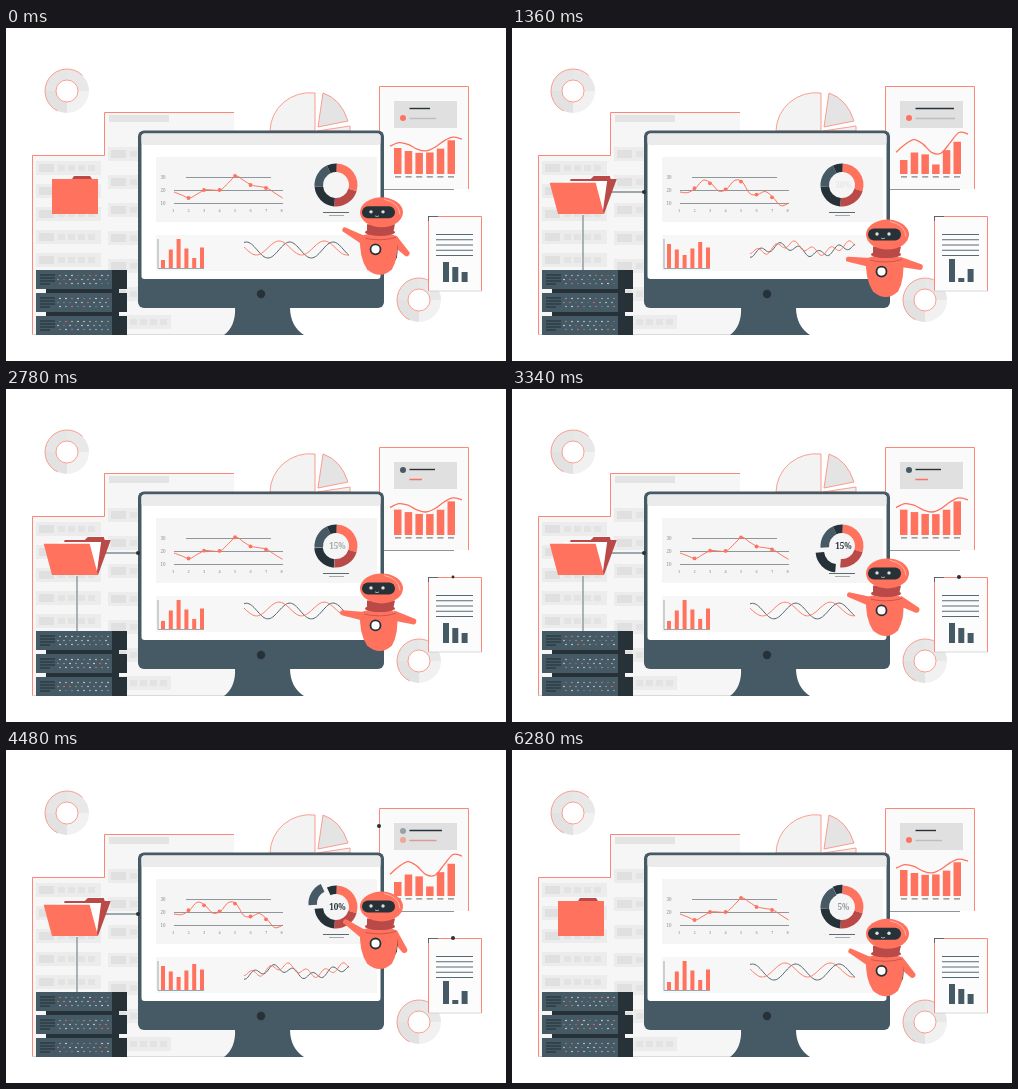
An HTML page for the animation above (6.3 s loop, 500 px wide and 333 px high).

```html
<!DOCTYPE html>
<html lang="en">
<head>
<meta charset="utf-8">
<title>Data dashboard robot</title>
<style>
html, body { margin: 0; width: 100%; height: 100%; overflow: hidden; background: #fff; }
svg { display: block; width: 500px; height: 333px; }
</style>
</head>
<body>
<svg id="stage" viewBox="0 0 500 333"></svg>
<script>
const LOOP = 6300, TURN = 2 * Math.PI / LOOP;
const RED = '#ff725e', BRICK = '#b94a48', SLATE = '#455a64', INK = '#263238';
const PAPER = '#f6f6f6', EDGE = '#fb8778';
const stage = document.getElementById('stage');
const { sin, cos, exp, hypot, floor, min, max, PI } = Math;

// --- helpers ---
function set(node, attrs) {
  for (const key in attrs) node.setAttribute(key, attrs[key]);
  return node;
}
function add(tag, attrs, parent = stage) {
  const node = document.createElementNS('http://www.w3.org/2000/svg', tag);
  parent.appendChild(node);
  return set(node, attrs);
}
const times = (n, make) => Array.from({ length: n }, (_, i) => make(i));
const box = (x, y, width, height, fill, parent) => add('rect', { x, y, width, height, fill }, parent);
const dot = (cx, cy, r, fill, parent) => add('circle', { cx, cy, r, fill }, parent);
const shape = (d, fill, parent) => add('path', { d, fill }, parent);
const stroke = (d, color, width = 1, parent = stage) =>
  add('path', { d, fill: 'none', stroke: color, 'stroke-width': width }, parent);
function label(x, y, size, text, fill) {
  const node = add('text', { x, y, fill, 'font-size': size, 'text-anchor': 'middle',
    'font-family': '"Noto Serif", "DejaVu Serif", serif' });
  node.textContent = text;
  return node;
}
const clamp = v => max(0, min(1, v));
const smooth = v => { v = clamp(v); return v * v * (3 - 2 * v); };
const mix = (a, b, k) => a + (b - a) * k;
const ramp = (t, from, to) => smooth((t - from) / (to - from));
const pulse = (t, on, onEnd, off, offEnd) => ramp(t, on, onEnd) * (1 - ramp(t, off, offEnd));

function polar(cx, cy, r, deg) {
  const a = (deg - 90) * PI / 180;
  return `${cx + r * cos(a)} ${cy + r * sin(a)}`;
}
function arc(cx, cy, r, from, to) {
  return `M${polar(cx, cy, r, from)}A${r} ${r} 0 ${to - from > 180 ? 1 : 0} 1 ${polar(cx, cy, r, to)}`;
}
function ring(cx, cy, outer, inner, from, to) {
  return arc(cx, cy, outer, from, to) + `L${polar(cx, cy, inner, to)}` +
    `A${inner} ${inner} 0 ${to - from > 180 ? 1 : 0} 0 ${polar(cx, cy, inner, from)}Z`;
}
function curve(pts) {
  let d = `M${pts[0]}`;
  for (let i = 0; i < pts.length - 1; i++) {
    const a = pts[max(0, i - 1)], b = pts[i], c = pts[i + 1], e = pts[min(pts.length - 1, i + 2)];
    d += `C${b[0] + (c[0] - a[0]) / 6} ${b[1] + (c[1] - a[1]) / 6} ` +
      `${c[0] - (e[0] - b[0]) / 6} ${c[1] - (e[1] - b[1]) / 6} ${c[0]} ${c[1]}`;
  }
  return d;
}
function random(n) {
  const v = sin(n * 127.1 + 11.7) * 43758.5453;
  return v - floor(v);
}

// --- backdrop ---
shape('M26 307V127H98V84H228V307Z', PAPER);
stroke('M26.5 307V127.5H98.5V84.5H228', EDGE);
stroke('M26 306.5H228', '#cfcfcf', .7);
function shelf(x, y, w) {
  box(x, y, w, 14, '#ececec');
  box(x + 3, y + 3, 15, 8, '#e0e0e0');
  for (let i = 0; i < 4; i++) box(x + 22 + i * 10, y + 4, 7, 6, '#e3e3e3');
}
box(103, 87, 60, 7, '#e4e4e4');
for (let i = 0; i < 7; i++) shelf(102, 119 + i * 28, 63);
for (let i = 0; i < 5; i++) shelf(30, 133 + i * 23, 65);

for (const [x, y] of [[61, 63], [413, 272]]) {
  ['#e8e8e8', '#f1f1f1', '#e2e2e2', '#e6e6e6'].forEach((fill, i) =>
    shape(ring(x, y, 22, 11, i * 90, i * 90 + 90), fill));
  stroke(arc(x, y, 22, 205, 405), EDGE, .8);
  add('circle', { cx: x, cy: y, r: 11, fill: '#fff', stroke: EDGE, 'stroke-width': .8 });
}
for (const [d, fill] of [
  ['M309 103H264A40 39 0 0 1 309 65Z', '#f3f3f3'],
  ['M312 99L317 65Q335 71 342 93Z', '#e4e4e4'],
  ['M311 103L344 98V103Z', '#f0f0f0']
]) set(shape(d, fill), { stroke: EDGE, 'stroke-width': .8 });

// --- report page ---
box(373, 58, 90, 103, '#fafafa');
stroke('M373.5 161V58.5H462.5V161', EDGE);
stroke('M378 161.5H448', '#7f8b91', .9);
box(388, 73, 63, 27, '#e0e0e0');
const keyDots = [dot(397, 81, 3, SLATE), dot(397, 90, 3, RED)];
const keyLines = [INK, '#bdbdbd', RED].map(color => stroke('', color, 1.4));
const reportLine = stroke('', RED, 1.3);
for (let i = 0; i < 6; i++) box(389 + i * 10.6, 148.4, 6, 1, '#666');

// --- small page ---
box(422, 188, 54, 75, '#fcfcfc');
stroke('M422.5 263V188.5H475.5V263', EDGE);
stroke('M422 263H476', '#c5cacc', .7);
stroke('M422 188.5H432M422.5 188V193', SLATE, .8);
for (let i = 0; i < 5; i++) stroke(`M430 ${206.5 + i * 5.25}H467`, SLATE, .9);

// --- monitor ---
shape('M229 279H284Q284 298 298 307H218Q230 298 229 279Z', SLATE);
set(box(132, 102.5, 246, 177.5, SLATE), { rx: 6 });
set(box(135.5, 105.5, 239, 145.5, '#fff'), { rx: 3 });
set(box(135.5, 105.5, 239, 11.5, '#ebebeb'), { rx: 3 });
box(150, 129, 221, 65, '#f5f5f5');
box(150, 207, 221, 36, '#f7f7f7');
dot(255, 266, 4.2, INK);

stroke('M180 149.5H265M168 162.5H277M168 175.5H277', '#777f83', .8);
for (let i = 0; i < 3; i++) label(157, 151 + i * 13, 4.5, 30 - i * 10, '#888');
for (let i = 0; i < 8; i++) label(167 + i * 15.5, 184, 4, i + 1, '#888');
const trend = stroke('', RED, 1);
const trendDots = times(6, () => dot(0, 0, 1.9, RED));

stroke('M152 211V240.5H198', '#77858c', .7);
const waves = [SLATE, RED].map(color => stroke('', color, .9));

// --- donut: clockwise edges of the slices and their shares ---
const EDGES = [2, 107, 185, 265, 335, 362], SHARES = [40, 30, 15, 10, 5];
const slices = [RED, BRICK, INK, SLATE, INK].map((fill, i) =>
  shape(ring(330, 157, 21.5, 13, EDGES[i], EDGES[i + 1]), fill));
const percent = set(label(331.5, 160, 8.2, '', INK), { 'font-weight': 700 });
stroke('M317 184.5H343', '#5c6b72', 1);
stroke('M323 187.5H338', '#8b969b', .8);

// --- bar sets: height as a rule of index i and stir k ---
const BARS = [
  { n: 6, x: 155, step: 7.8, w: 4, base: 240, fill: RED,
    tall: (i, k) => 18 + i / 2 + mix(-10, 6, k * k) * cos(PI * i / 2) },
  { n: 6, x: 388, step: 10.7, w: 7.5, base: 146, fill: RED,
    tall: (i, k) => 26 - 3.2 * i + .19 * i ** 3 - k * (5 + 7 * cos(PI * i / 1.5)) },
  { n: 3, x: 437, step: 9.3, w: 6, base: 254, fill: SLATE,
    tall: (i, k) => 20 - 5 * i + k * k * (7 * cos(PI * i) - 4) }
];
for (const set of BARS) set.nodes = times(set.n, () => box(0, 0, 0, 0, set.fill));

const TREND = [164, 170, 162, 162, 148, 157, 160, 170];
function trendY(i, k) {
  const a = TREND[floor(i / 2)], b = TREND[floor((i + 1) / 2)];
  const stir = 5 * sin(PI * i / 2) - 10 * cos(i / 3 - .5);
  return (a + b) / 2 + k * stir * min(1, i / 2);
}
const reportY = (i, k) => 121 - .9 * i - 5.5 * cos(PI * (i - 1) / 3) + 6 * k * cos(1.25 * i);
const WAVES = [
  (x, k) => 222 + mix(8 * cos((x - 262) / 6.9), 3.5 * sin(x / 3.1) + 4 * cos((x - 305) / 11), k),
  (x, k) => 220 + mix(-7 * cos((x - 273) / 7.2), 3.5 * cos(x / 2.9) - 4 * cos((x - 278) / 10), k)
];

// --- servers ---
const leds = [];
for (let unit = 0; unit < 3; unit++) {
  const y = 242 + unit * 23;
  if (unit) box(40, y - 4, 73, 4, INK);
  box(30, y, 77, 19, SLATE);
  box(106, y, 15, 19, INK);
  for (let i = 0; i < 4; i++) stroke(`M34 ${y + 5 + i * 3}H${i < 3 ? 49 : 44}`, INK, 1.1);
  for (let row = 0; row < 3; row++)
    for (let i = 0; i < 9; i++)
      leds.push(dot(54 + i * 6 - (row % 2) * 2, y + 5.5 + row * 4, .75, '#fff'));
}

// --- folder and links ---
const linkDown = stroke('', '#7c888d', 1.2);
const linkRight = stroke('', SLATE, 1.2);
// each leaf leans around the bottom edge
const leaves = [
  ['M46 186V151H66L68 148H84L86 151H92V186Z', BRICK, -20, 0],
  ['M47 185V153H90.5V185Z', '#fff', -8, 0],
  ['M46 186V151H92V186Z', RED, 15, .11]
].map(([d, fill, lean, squash]) => ({ node: shape(d, fill), lean, squash }));
const pins = [[132, 164, 900, 5500], [447, 188, 2650, 6000], [373, 76, 3550, 6000]]
  .map(([x, y, on, off]) => ({ on, off, node: dot(x, y, 0, INK) }));

// --- robot ---
const bot = add('g', {});
const armRight = shape('', RED, bot);
const armShade = shape('M388 208Q393 216 391 229L386 238Z', INK, bot);
shape('M354 208Q374 201 391 208Q393 229 386 241Q374 252 361 241Q353 229 354 208Z', RED, bot);
stroke('M355 209Q374 214 390 209', BRICK, .7, bot);
shape('M361 196H389L387 205Q374 210 361 205Z', BRICK, bot);
add('ellipse', { cx: 374, cy: 204, rx: 15, ry: 3.5, fill: BRICK }, bot);
add('ellipse', { cx: 375.5, cy: 184, rx: 21.5, ry: 15, fill: RED }, bot);
set(box(356, 178, 33, 12, INK, bot), { rx: 6 });
stroke('M378 171Q393 174 394 186', '#ffc4ba', .8, bot);
for (const x of [365, 377]) dot(x, 183.5, 1.7, '#e0e0e0', bot);
stroke('M369 187.5Q371 189 373 187.5', '#e0e0e0', .7, bot);
add('circle', { cx: 369.5, cy: 221, r: 5, fill: '#fff', stroke: INK, 'stroke-width': 1.8 }, bot);
const armLeft = shape('', RED, bot);
function arm(sx, sy, hx, hy, wide, thin) {
  const len = hypot(hx - sx, hy - sy), nx = -(hy - sy) / len, ny = (hx - sx) / len;
  return `M${sx + nx * wide} ${sy + ny * wide}L${hx + nx * thin} ${hy + ny * thin}` +
    `A${thin} ${thin} 0 0 0 ${hx - nx * thin} ${hy - ny * thin}L${sx - nx * wide} ${sy - ny * wide}Z`;
}

// --- drawing ---
function drawCharts(t) {
  // charts are stirred up and calm down twice per loop
  const k = pulse(t % (LOOP / 2), 0, 1350, 1350, 3000);
  for (const { nodes, x, step, w, base, tall } of BARS)
    nodes.forEach((node, i) => {
      const height = tall(i, k);
      set(node, { x: x + i * step, y: base - height, width: w, height });
    });

  const points = times(15, i => [168 + i * 7.75, trendY(i, k)]);
  set(trend, { d: curve(points) });
  trendDots.forEach((node, i) => {
    const [cx, cy] = points[2 + i * 2];
    set(node, { cx: cx - 1, cy });
  });
  set(reportLine, { d: curve(times(9, i => [384 + i * 9, reportY(i, k)])) });
  waves.forEach((node, w) =>
    set(node, { d: curve(times(43, i => [238 + i * 2.5, WAVES[w](238 + i * 2.5, smooth(k * 1.6))])) }));
}

function drawDonut(t) {
  percent.textContent = '';
  slices.forEach((node, i) => {
    const start = 50 + i * 1285;
    const show = clamp(min(t - start, start + 1285 - t) / 400);
    const angle = ((EDGES[i] + EDGES[i + 1]) / 2 - 90) * PI / 180, push = 7 * show ** 3;
    set(node, { transform: `translate(${push * cos(angle)} ${push * sin(angle)})` });
    if (show > 0) {
      percent.textContent = SHARES[i] + '%';
      set(percent, { opacity: show });
    }
  });
}

function drawLegend(t) {
  const focus = pulse(t, 1400, 2100, 3800, 5100), grow = pulse(t, 0, 1200, 5400, LOOP);
  set(keyDots[0], { opacity: focus });
  set(keyDots[1], { opacity: 1 - focus });
  set(keyLines[0], { d: `M403.5 80.5H${424 + 18 * grow - 13 * focus}` });
  for (const line of keyLines.slice(1)) set(line, { d: `M403.5 90.5H${430 + 13 * grow - 27 * focus}` });
  set(keyLines[2], { opacity: focus });
}

function drawFolder(t) {
  const open = pulse(t, 350, 1150, 5550, 6150);
  for (const { node, lean, squash } of leaves)
    set(node, { transform:
      `translate(46 186) skewX(${lean * open}) scale(1 ${1 - squash * open}) translate(-46 -186)` });
  const link = pulse(t, 850, 1300, 5350, 5700);
  set(linkDown, { d: `M71 187V${mix(187, 242, link)}`, opacity: link > 0 ? 1 : 0 });
  set(linkRight, { d: `M98 164H${mix(98, 132, link)}`, opacity: link > 0 ? 1 : 0 });
  for (const { node, on, off } of pins) set(node, { r: 2 * pulse(t, on, on + 200, off, off + 200) });
}

function drawRobot(t) {
  const a = t * TURN;
  const y = 28 * sin(a - .15) + 3 * cos(2 * a) + 1.5 * cos(3 * a);
  const spread = cos(a - 2);
  set(bot, { transform: `translate(0 ${y})` });
  set(armLeft, { d: arm(358, 212, 338 - 2 * spread, 204 + 6 * spread, 4.5, 2.5) });
  set(armRight, { d: arm(387, 211, 403 + 6 * spread, 222 - 7 * spread, 5, 3) });
  set(armShade, { opacity: clamp(.5 - spread) });
}

function drawLeds(t) {
  leds.forEach((node, i) => {
    const step = floor(t / 315 + random(i) * 20) % 20;
    const v = random(i * 20 + step);
    set(node, { fill: v > .86 ? RED : '#fff', opacity: clamp(.15 + v) });
  });
}

const began = performance.now();
function tick() {
  const t = (performance.now() - began) % LOOP;
  for (const draw of [drawCharts, drawDonut, drawLegend, drawFolder, drawRobot, drawLeds]) draw(t);
  requestAnimationFrame(tick);
}
tick();
</script>
</body>
</html>
```
